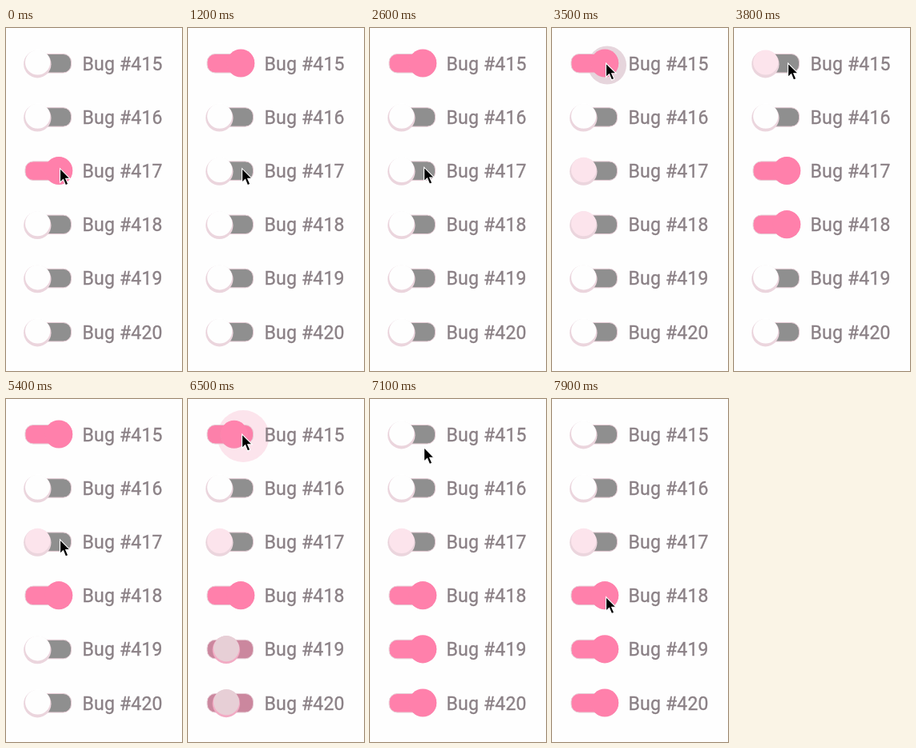
Animation of 220x429 px, one loop 8 s. Source, as an HTML page:

```html
<!DOCTYPE html>
<html lang="en">
<head>
<meta charset="utf-8">
<title>Switches</title>
<style>
  html, body { margin: 0; width: 100%; height: 100%; overflow: hidden; background: #fefefe; }
  svg { display: block; width: 100%; height: 100%; }
  text {
    font: 23px Roboto, sans-serif; letter-spacing: .2px;
    fill: #8b8186; stroke: #8b8186; stroke-width: .35px;
  }
</style>
</head>
<body>
<svg id="stage" viewBox="0 0 220 429"></svg>
<script>
const LOOP = 8000, STEP = 100;
const white = [254, 254, 254], tint = [252, 228, 236], pink = [255, 128, 171],
      gray = [143, 143, 143], dusk = [229, 213, 218];

// Each click flips a few switches; "rest" colours the knobs it turns off.
const clicks = [
  { at: 900, flips: [0, 2], rest: white },
  { at: 3500, flips: [0, 2, 3], rest: tint },
  { at: 4700, flips: [0, 2], rest: tint },
  { at: 6300, flips: [0, 4, 5], rest: white }
];
// The pointer travels from row to row.
const moves = [
  { from: 2550, to: 3350, row: 0 },
  { from: 3800, to: 4570, row: 1.92 },
  { from: 5350, to: 5650, row: 2.5 },
  { from: 5650, to: 6050, row: 0 },
  { from: 6920, to: 7950, row: 3.05 }
];

const stage = document.getElementById('stage');
const rowY = i => 44 + 67.2 * i;
const clamp = v => Math.min(1, Math.max(0, v));
const smooth = v => (v = clamp(v), v * v * (3 - 2 * v));
const lerp = (a, b, k) => a + (b - a) * k;
const mix = (a, b, k) => a.map((v, i) => lerp(v, b[i], k));
const rgb = c => `rgb(${c.map(Math.round)})`;

function set(node, attrs) {
  for (const key in attrs) node.setAttribute(key, attrs[key]);
  return node;
}
function add(tag, attrs) {
  return stage.appendChild(set(document.createElementNS('http://www.w3.org/2000/svg', tag), attrs));
}

const ripple = add('circle', {});
const rows = Array.from({ length: 6 }, (_, i) => {
  const y = rowY(i);
  const track = add('rect', { x: 24, y: y - 11.5, width: 57.5, height: 23.5, rx: 10, stroke: '#e6ccd5' });
  const shade = add('circle', {}), knob = add('circle', {});
  add('text', { x: 95.5, y: y + 8.5 }).textContent = 'Bug #' + (415 + i);
  return { y, track, shade, knob, flips: clicks.filter(c => c.flips.includes(i)), start: i === 2 };
});
const pointer = add('path', {
  d: 'M0 0V17.5L4 13.8L7 21L10.2 19.6L7.2 12.7H12.6Z',
  fill: '#000', stroke: '#fff', 'stroke-width': 1.1
});

function drawRow({ y, track, shade, knob, flips, start }, t) {
  const done = flips.filter(c => t >= c.at), last = done[done.length - 1];
  const on = (start + done.length) % 2;
  const k = last ? smooth((t - last.at - 140) / 160) : 1;
  const pos = on ? k : 1 - k;
  const hue = on ? clamp(k * 1.7) : 1 - clamp((k - .3) / .7);
  // Turning on passes through a dusky tone, turning off fades straight.
  const rest = last ? last.rest : white;
  const mid = on ? dusk : mix(rest, pink, .5);
  const face = hue < .5 ? mix(rest, mid, hue * 2) : mix(mid, pink, hue * 2 - 1);
  const cx = lerp(39.3, 66, pos);
  set(track, { fill: rgb(mix(gray, pink, hue)) });
  set(shade, { cx, cy: y + lerp(1.2, .4, pos), r: 17.2, fill: rgb(mix([235, 213, 221], [248, 135, 174], hue)) });
  set(knob, { cx: cx + .3 * (1 - pos), cy: y - lerp(1, .3, pos), r: lerp(15.6, 17.2, pos), fill: rgb(face) });
}

function pointerY(t) {
  return moves.reduce(
    (y, m) => lerp(y, rowY(m.row), smooth((t - m.from) / (m.to - m.from))),
    rowY(1.96)
  );
}

function drawRipple(t) {
  const click = clicks.find(c => t >= c.at && t < c.at + 300);
  if (!click) return set(ripple, { r: 0 });
  const age = (t - click.at) / 200;
  set(ripple, {
    cx: 69, cy: pointerY(click.at) + 2.5,
    r: lerp(24, 32.5, 1 - (1 - clamp(age)) ** 2),
    fill: rgb(mix([230, 213, 220], tint, clamp(age)))
  });
}

function draw(now) {
  const t = Math.floor((now % LOOP) / STEP) * STEP;
  rows.forEach(row => drawRow(row, t));
  drawRipple(t);
  set(pointer, { transform: `translate(67.5 ${pointerY(t)})` });
}

const begin = performance.now();
function tick() {
  draw(performance.now() - begin);
  requestAnimationFrame(tick);
}
tick();
</script>
</body>
</html>
```
